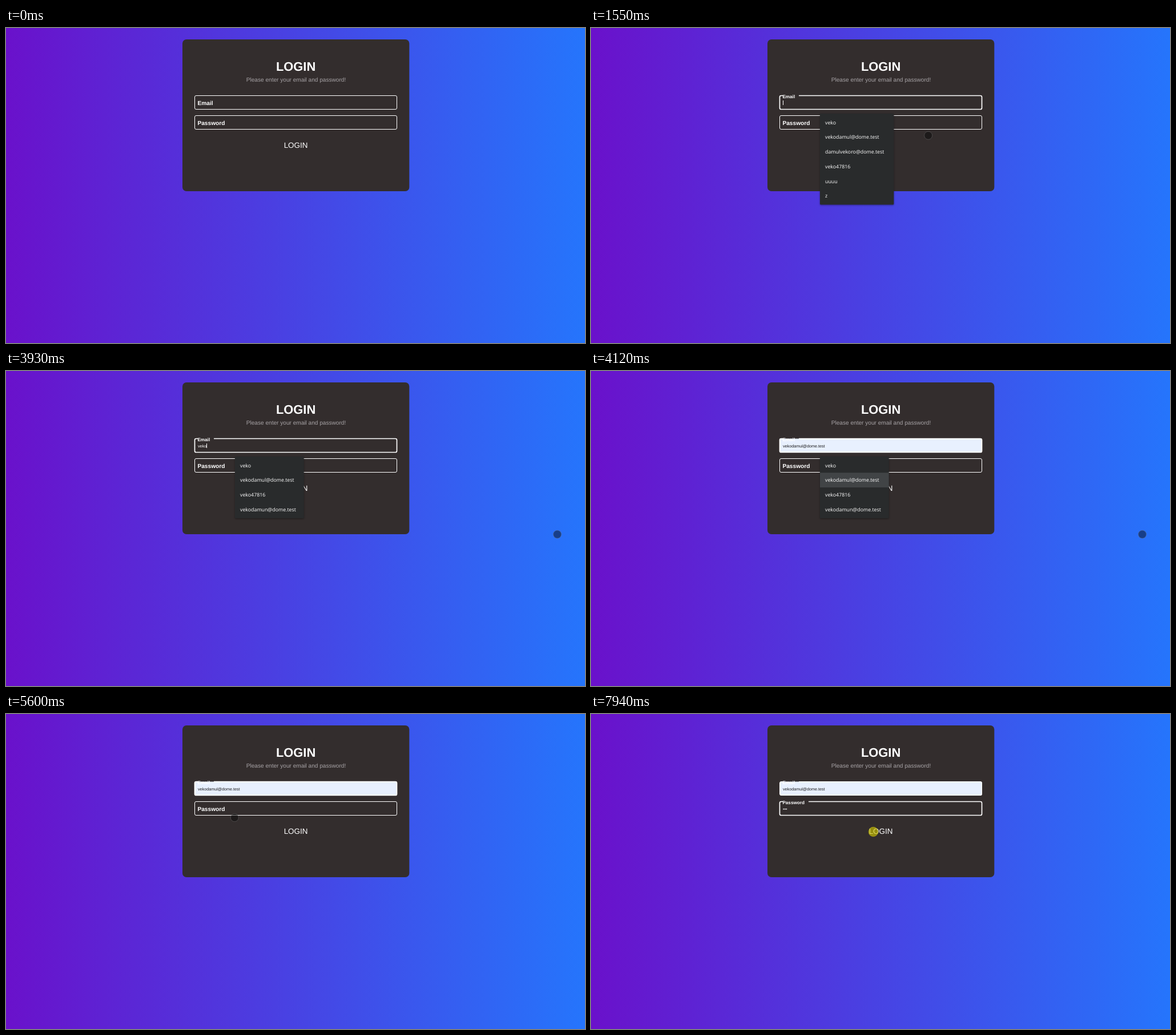
An HTML page that plays this animation: 1014x552 px, repeating every 8000 ms.

```html
<!DOCTYPE html>
<html lang="en">
<head>
<meta charset="utf-8">
<title>Login form</title>
<style>
  html, body { margin: 0; width: 100%; height: 100%; overflow: hidden; }
  body { background: linear-gradient(to right, #6a11cb, #2575fc); }
  svg { display: block; width: 1014px; height: 552px; }
  text { font-family: "Liberation Sans", Arial, sans-serif; fill: #fff; text-rendering: geometricPrecision; white-space: pre; }
  .mid { text-anchor: middle; }
  .title { font-size: 21.9px; font-weight: bold; }
  .sub { font-size: 10.1px; fill: #a7a3a6; }
  .button { font-size: 13.4px; }
  .label { font-size: 10.2px; font-weight: bold; }
  .value { font-size: 7.2px; }
  .edge { fill: none; stroke: #fff; }
  .caret { fill: #fff; }
  #menu { filter: drop-shadow(0 1px 1.5px rgba(0, 0, 0, .4)); }
  #menu text { font: 8.8px "Open Sans", "Noto Sans", sans-serif; }
</style>
</head>
<body>
<svg viewBox="0 0 1014 552">
  <rect x="309" y="20" width="397.3" height="266" rx="7" fill="#332d2d"/>
  <text class="mid title" x="507.6" y="75">LOGIN</text>
  <text class="mid sub" x="508" y="93.6">Please enter your email and password!</text>
  <text class="mid button" x="507.5" y="209.6">LOGIN</text>
  <g id="form"></g>
  <g id="menu">
    <rect id="sheet" x="401" y="150" rx="1.5" fill="#292b2c"/>
    <rect id="active" x="401" height="25.75" fill="#414446"/>
  </g>
  <circle id="pointer"/>
</svg>
<script>
const LOOP = 8000, ROW = 25.75;
const $ = id => document.getElementById(id);
const clamp = v => Math.min(1, Math.max(0, v));
const span = (t, a, b) => clamp((t - a) / (b - a));
const easeOut = p => 1 - (1 - p) ** 3;
const easeInOut = p => p * p * (3 - 2 * p);

function add(parent, tag, attrs) {
  const el = document.createElementNS("http://www.w3.org/2000/svg", tag);
  set(el, attrs);
  return parent.appendChild(el);
}
function set(el, attrs) {
  for (const key in attrs) el.setAttribute(key, attrs[key]);
}
const show = (el, on) => set(el, { visibility: on ? "visible" : "hidden" });

// Latest entry of a [time, value] list
const at = (list, t) => list.reduce((v, [time, next]) => t >= time ? next : v, null);

function makeField(y, name, notchEnd) {
  const g = add($("form"), "g", {});
  const fill = add(g, "rect", { x: 330.8, y, width: 354, height: 24.2, rx: 2, fill: "#e8f0fe" });
  const edge = add(g, "path", { class: "edge" });
  const value = add(g, "text", { class: "value", x: 336, y: y + 15.1 });
  const label = add(g, "text", { class: "label" });
  const caret = add(g, "rect", { class: "caret", y: y + 8.5, width: 1, height: 8 });
  label.textContent = name;

  return s => {
    const k = easeOut(s.lift);
    const top = y, bottom = y + 24, left = 330.5, right = 684.5, r = 2.5;
    const from = 336 + (notchEnd - 336) * span(s.lift, 0.3, 0.8);
    set(edge, {
      d: `M${from} ${top}H${right - r}q${r} 0 ${r} ${r}V${bottom - r}q0 ${r} ${-r} ${r}` +
         `H${left + r}q${-r} 0 ${-r} ${-r}V${top + r}q0 ${-r} ${r} ${-r}H336`,
      "stroke-width": s.focus ? 1.7 : 1
    });
    set(label, { transform: `translate(335.4 ${y + 16.1 - 11.7 * k}) scale(${1 - 0.2 * k})` });
    set(fill, { opacity: s.fill });
    value.textContent = s.text;
    value.style.fill = caret.style.fill = s.fill > 0.5 ? "#1a1a1a" : "#fff";
    set(caret, { x: 336 + Math.round(s.text ? value.getComputedTextLength() : 0) });
    show(caret, s.caret);
  };
}
const drawEmail = makeField(118.5, "Email", 364);
const drawPassword = makeField(153.5, "Password", 381);

const nick = "veko", host = "@dome.test";
const mail = nick + "damul" + host;
const digits = nick + "47816";
const other = "damul" + nick + "ro" + host;
const twin = nick + "damun" + host;

const emailText = [[0, ""], [2560, "v"], [2660, "ve"], [2830, "vek"], [2930, nick], [4080, mail]];
const dots = [[0, ""], [6740, "•"], [6840, "••"], [7070, "•••"]];
const emailCaret = [[0, 0], [1270, 1], [1760, 0], [2260, 1], [3420, 0], [3930, 1], [3950, 0], [4430, 1], [4880, 0]];
const passCaret = [[0, 0], [5930, 1], [6430, 0], [6740, 1], [7570, 0]];
const menus = [
  [0, [nick, mail, other, digits, "uuuu", "z"]],
  [2660, [nick, mail, other, digits, twin]],
  [2830, [nick, mail, digits, twin]]
];
const rows = Array.from({ length: 6 }, (_, i) =>
  add($("menu"), "text", { x: 410, y: 168.6 + i * ROW }));

function drawMenu(t) {
  const items = at(menus, t);
  const width = items.includes(other) ? 129.3 : 120.6;
  set($("menu"), { opacity: span(t, 1420, 1500) * (1 - span(t, 4430, 4600)) });
  set($("sheet"), { width, height: items.length * ROW + 5 });
  set($("active"), { width, y: 152.5 + (t < 4080 ? 0 : ROW) });
  show($("active"), t >= 3950);
  rows.forEach((row, i) => row.textContent = items[i] || "");
}

// Each move: start, end, x, y
const moves = [
  [20, 680, 361, 126.7],
  [1040, 1050, 361.7, 128.5],
  [1350, 1830, 965.5, 286.2],
  [4980, 5630, 397, 181],
  [5680, 5860, 369.5, 173.6],
  [7080, 7240, 457, 200],
  [7440, 7620, 488.5, 204.3],
  [7750, 7840, 494.4, 206.4]
];
const presses = [[1220, 1300], [5890, 6010], [7920, 8000]];

function drawPointer(t) {
  let cx = 965, cy = 562;
  for (const [a, b, x, y] of moves) {
    const p = easeInOut(span(t, a, b));
    cx += (x - cx) * p;
    cy += (y - cy) * p;
  }
  const down = presses.some(([a, b]) => t >= a && t < b);
  set($("pointer"), {
    cx, cy,
    r: down ? 8.3 : 7,
    fill: down ? "rgba(205,195,0,.65)" : "rgba(5,5,5,.46)",
    stroke: down ? "rgba(200,190,20,.45)" : "rgba(125,125,125,.4)"
  });
}

function draw(t) {
  drawEmail({
    lift: span(t, 1288, 1488),
    focus: t >= 1340 && t < 5930,
    fill: span(t, 3950, 4040),
    text: at(emailText, t),
    caret: at(emailCaret, t)
  });
  drawPassword({
    lift: span(t, 5920, 6120),
    focus: t >= 5940,
    fill: 0,
    text: at(dots, t),
    caret: at(passCaret, t)
  });
  drawMenu(t);
  drawPointer(t);
}

const start = performance.now();
function tick() {
  draw((performance.now() - start) % LOOP);
  requestAnimationFrame(tick);
}
tick();
</script>
</body>
</html>
```
